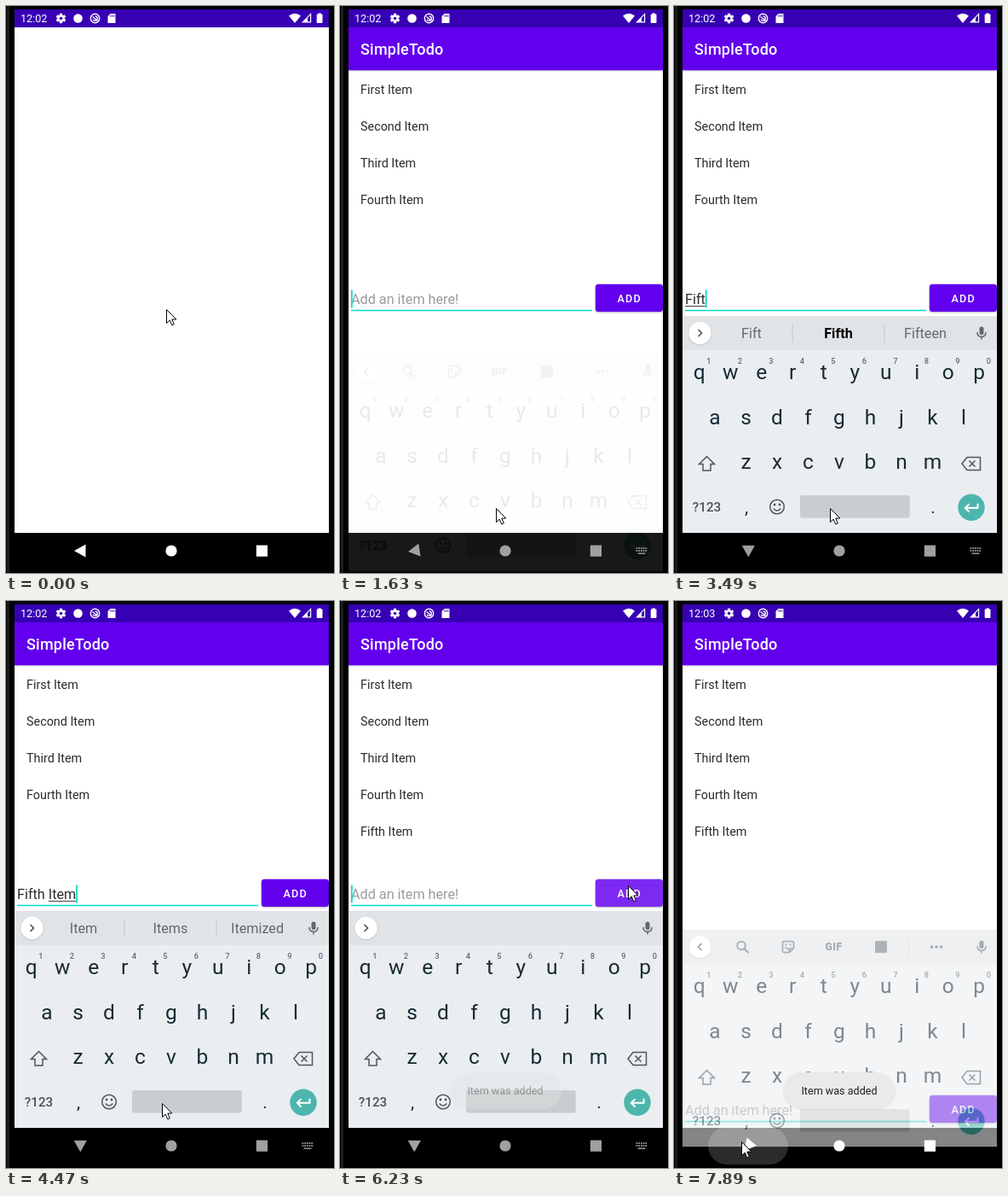
An HTML page with a canvas for the animation above (8000 ms loop, 385 by 664 pixels).

```html
<!DOCTYPE html>
<html lang="en">
<head>
<meta charset="utf-8">
<title>Todo list</title>
<style>
html, body { margin: 0; width: 100%; height: 100%; overflow: hidden; background: #000; }
canvas { display: block; width: 385px; height: 664px; }
</style>
</head>
<body>
<canvas id="stage"></canvas>
<script>
const W = 385, H = 664, LOOP = 8000, FONT = 'Roboto, sans-serif';
const PURPLE = '#6200ee', TEAL = '#03dac5', INK = '#172b34', SOFT = '#5f6a70', KEY = '#4b575d';
const scale = Math.max(1, window.devicePixelRatio || 1);

// Moments of the story, in ms.
const LAUNCH = 120, FOCUS = 1630, TYPE = 2720, TYPED = 4470, ADDED = 6080, TOOLS = 6640,
  MINUTE = 7480, BACK = 7620, CLOSE = 7690;
const PHRASE = 'Fifth Item';
const GUESSES = [['Fifth', 'Fifteen', 'Fifties'], ['Item', 'Items', 'Itemized']];

function prepare(canvas) {
  canvas.width = W * scale;
  canvas.height = H * scale;
  const c = canvas.getContext('2d');
  c.scale(scale, scale);
  return c;
}
const screen = prepare(document.getElementById('stage'));
const sheet = document.createElement('canvas');
const keysCtx = prepare(sheet);
let g = screen;

const ramp = (t, a, b) => Math.min(1, Math.max(0, (t - a) / (b - a)));
const easeOut = (u, power) => 1 - (1 - u) ** power;
const smooth = u => u * u * (3 - 2 * u);
const held = t => Math.floor((t + 20) / 135) * 135;

function rect(x, y, w, h, color) {
  g.fillStyle = color;
  g.fillRect(x, y, w, h);
}
function pill(x, y, w, h, r, color) {
  g.fillStyle = color;
  g.beginPath();
  g.roundRect(x, y, w, h, r);
  g.fill();
}
function dot(x, y, r, color) {
  g.fillStyle = color;
  g.beginPath();
  g.arc(x, y, r, 0, 7);
  g.fill();
}
function text(s, x, y, size, color, align = 'left', weight = 400, spacing = 0) {
  g.font = `${weight} ${size}px ${FONT}`;
  g.letterSpacing = spacing + 'px';
  g.textAlign = align;
  g.fillStyle = color;
  g.fillText(s, x, y);
  const width = g.measureText(s).width;
  g.letterSpacing = '0px';
  return width;
}
function stroke(d, x, y, color, width = 1.5) {
  g.save();
  g.translate(x, y);
  g.strokeStyle = color;
  g.lineWidth = width;
  g.stroke(new Path2D(d));
  g.restore();
}
function fill(d, x, y, color, turn = 0) {
  g.save();
  g.translate(x, y);
  g.rotate(turn * Math.PI / 180);
  g.fillStyle = color;
  g.fill(new Path2D(d));
  g.restore();
}
function shade(blur, dy, alpha, paint) {
  g.save();
  g.shadowColor = `rgba(0,0,0,${alpha})`;
  g.shadowBlur = blur * scale;
  g.shadowOffsetY = dy * scale;
  paint();
  g.restore();
}

function typedText(t) {
  if (t < TYPE || t >= ADDED) return '';
  const u = ramp(t, TYPE, TYPED) ** 1.3;
  return PHRASE.slice(0, 1 + Math.floor(u * (PHRASE.length - 1)));
}
function caretOn(t) {
  if (t < FOCUS) return false;
  const edit = t >= ADDED ? ADDED : t >= TYPED ? TYPED : t >= TYPE ? t : FOCUS + 120;
  return Math.floor((t - edit) / 500) % 2 === 0 || t < edit;
}
const keyboardShown = t =>
  easeOut(ramp(held(t), 1600, 2000), 2) - ramp(held(t), 7680, 8020);

function statusBar(t) {
  rect(10, 4, 369, 21, '#3700b3');
  text(t < MINUTE ? '12:02' : '12:03', 17, 19, 12.6, '#fff');
  for (let i = 0; i < 6; i++) {
    g.save();
    g.translate(64.5, 14.5);
    g.rotate(i * Math.PI / 3);
    rect(-1.6, -5.8, 3.2, 4, '#fff');
    g.restore();
  }
  dot(64.5, 14.5, 4.2, '#fff');
  dot(64.5, 14.5, 1.8, '#3700b3');
  dot(84.5, 14.5, 5.3, '#fff');
  stroke('M5.2 0A5.2 5.2 0 1 1-5.2 0A5.2 5.2 0 1 1 5.2 0M-3 -2L3 3M-2.4 1.2A2.7 2.7 0 1 0 0 -2.6', 104.5, 14.5, '#fff', 1.4);
  fill('M-1.5-5.5H4.5V5.5H-4.5V-2.5Z', 124, 14.5, '#fff');
  for (let i = 0; i < 3; i++) rect(122.3 + i * 2, 10.5, 1, 2.2, '#3700b3');
  fill('M0 6L-7-2.6Q0-8 7-2.6Z', 339, 14, '#fff');
  stroke('M-4.6 4.8L4.6-4.6V4.8Z', 353, 14, '#fff', 1.2);
  fill('M-4.6 4.8L1 -1V4.8Z', 353, 14, '#fff');
  pill(364.7, 9.6, 6.8, 10.4, 1, '#fff');
  rect(366.5, 8.4, 3.2, 2, '#fff');
}

function inputRow(t) {
  const focused = t >= FOCUS, raised = focused && t < CLOSE;
  g.save();
  if (raised) g.translate(0, -253);
  rect(13, 608.8, 283, focused ? 1.5 : 1, focused ? TEAL : '#858585');

  const entry = typedText(t), split = entry.lastIndexOf(' ') + 1;
  let end = 13;
  if (entry) {
    const from = end + text(entry.slice(0, split), end, 602.3, 16.2, '#2a2a2a');
    end = from + text(entry.slice(split), from, 602.3, 16.2, '#2a2a2a');
    rect(from, 604, end - from, 1, '#444');
  } else {
    text('Add an item here!', 13, 602.3, 16.2, '#9b9b9b');
  }
  if (caretOn(t)) rect(end, 585.5, 1.7, 21, TEAL);

  shade(2, 1, .3, () => pill(299.8, 578.8, 79.2, 32.3, 3.6, PURPLE));
  const glow = t < ADDED ? 0 : .165 * (1 - ramp(t, 6350, 6560));
  pill(299.8, 578.8, 79.2, 32.3, 3.6, `rgba(255,255,255,${glow})`);
  text('ADD', 339.7, 599.7, 12.6, '#fff', 'center', 500, 1.12);
  g.restore();
}

function app(t) {
  rect(10, 25, 369, 592, '#fff');
  if (t < LAUNCH) return;
  g.save();
  g.beginPath();
  g.rect(10, 25, 369, 592);
  g.clip();
  shade(2, .5, .22, () => rect(10, 25, 369, 50.3, PURPLE));
  text('SimpleTodo', 24, 57.2, 18, '#fff', 'left', 500, .22);
  ['First', 'Second', 'Third', 'Fourth', 'Fifth'].forEach((name, i) => {
    if (i < 4 || t >= ADDED) text(name + ' Item', 24, 102.6 + i * 43.1, 14.37, '#2a2a2a');
  });
  inputRow(t);
  g.restore();
}

function toolStrip() {
  stroke('M3.3-1.5A4.8 4.8 0 1 1-6.3-1.5A4.8 4.8 0 1 1 3.3-1.5M2 2L7 7', 80.5, 383, SOFT, 1.8);
  stroke('M-6.5-4.5Q-6.5-6.5-4.5-6.5H4.5Q6.5-6.5 6.5-4.5V1.5L1.5 6.5H-4.5Q-6.5 6.5-6.5 4.5ZM1.5 6V2H6.5M-3.5 0Q-2 3 1 2.5', 134, 383, SOFT);
  dot(131.5, 380.5, 1, SOFT);
  dot(136.5, 380.5, 1, SOFT);
  text('GIF', 187.5, 387.3, 12, SOFT, 'center', 900, .6);
  rect(236, 376, 14, 14, '#6f797e');
  rect(275, 372, 1, 22, '#cbd0d3');
  for (let i = 0; i < 3; i++) dot(302.5 + i * 5.5, 383, 1.8, SOFT);
}

function suggestions(entry) {
  const family = GUESSES[entry.includes(' ') ? 1 : 0], word = entry.split(' ').pop();
  const words = [word, ...family.filter(w => w !== word)].filter(Boolean).slice(0, 3);
  words.forEach((w, i) => {
    const best = i === 1 && w === family[0];
    text(w, 91 + i * 102, 389.2, 16.2, best ? '#000' : SOFT, 'center', best ? 700 : 400);
    if (i) rect(36.5 + i * 102 + (i - 1) * 6, 372, 1, 22, '#c3c8cb');
  });
}

function keyRows() {
  ['qwertyuiop', 'asdfghjkl', 'zxcvbnm'].forEach((row, r) => {
    const left = 194 - (row.length - 1) * 18.25;
    [...row].forEach((key, i) => text(key, left + i * 36.5, 437 + r * 52.7, 24.5, INK, 'center'));
  });
  for (let i = 0; i < 10; i++) text((i + 1) % 10, 41 + i * 36.5, 418.5, 9.3, '#5d6a70', 'center', 500);
  stroke('M0-8.5L-9 .5H-4.5V8H4.5V.5H9Z', 38.5, 536, KEY);
  stroke('M-11 0L-5-7.5H10.5V7.5H-5ZM-2.5-3.5L4.5 3.5M4.5-3.5L-2.5 3.5', 349, 536, KEY);
  text('?123', 38.5, 592, 15.2, '#46525a', 'center', 500);
  text(',', 85, 594, 21, INK, 'center');
  text('.', 304, 594, 21, INK, 'center');
  stroke('M8.3 0A8.3 8.3 0 1 1-8.3 0A8.3 8.3 0 1 1 8.3 0M-4.3 2Q0 7 4.3 2', 121, 586.5, KEY);
  dot(118, 584, 1.4, KEY);
  dot(124, 584, 1.4, KEY);
  pill(148, 573, 128.7, 26.5, 2.5, '#c9cdd0');
  dot(349, 587.2, 15.7, '#4db6ac');
  stroke('M7.5-5V0H-7M-2.5-4.7L-7.2 0L-2.5 4.7', 349, 587.8, '#fff', 2);
}

function keyboard(t) {
  g = keysCtx;
  g.clearRect(0, 0, W, H);
  rect(10, 363, 369, 254, '#eaeef1');
  rect(10, 363, 369, 40, '#e0e4e6');
  const tools = t < TYPE || t >= TOOLS;
  shade(2, .6, .2, () => dot(30.5, 383, 13.2, '#fff'));
  stroke(tools ? 'M2-4L-2 0L2 4' : 'M-2-4L2 0L-2 4', 30.5, 383, '#4a555b', 1.7);
  if (tools) toolStrip();
  else if (t < ADDED) suggestions(typedText(t));
  pill(358.5, 375.5, 5, 9.5, 2.5, SOFT);
  stroke('M-5-1Q-5 4.3 0 4.3Q5 4.3 5-1M0 4V7.5', 361, 383, SOFT);
  keyRows();
  g = screen;

  const shown = keyboardShown(t);
  g.save();
  g.globalAlpha = shown;
  g.drawImage(sheet, 0, 50 * (1 - shown), W, H);
  g.restore();
}

function navIcons(t) {
  const open = t >= FOCUS && t < CLOSE;
  const color = t < LAUNCH || t >= CLOSE ? '#fff' : open ? '#a0a0a0' : '#dedede';
  if (t >= BACK) pill(40, 616, 94, 44, 22, 'rgba(255,255,255,.17)');
  fill('M-7.3 0L6.2-7.6V7.6Z', 87.3, 638, color, -90 * keyboardShown(t));
  dot(194, 638, 6.6, color);
  rect(293.8, 631.5, 13.2, 13.2, color);
  if (open) {
    for (let i = 0; i < 10; i++) rect(347.5 + i % 5 * 2.7, 634 + (i >> 2 > 1 || i > 4 ? 3 : 0), 1.8, 1.9, '#909090');
    rect(349.5, 640.3, 9, 1.6, '#909090');
  }
}

function toast(t) {
  const alpha = ramp(held(t), 6090, 6400);
  g.save();
  g.globalAlpha = alpha;
  shade(2, .5, .06, () => pill(128, 552, 132, 43, 21.5, '#e8eaeb'));
  text('Item was added', 194, 578.2, 12.6, '#222', 'center');
  g.restore();
}

function pointer(t) {
  const now = held(t);
  const glides = [
    [182.5, 587.5, easeOut(ramp(now, 0, 1080), 3)],
    [338, 333, smooth(ramp(now, 5000, 5940))],
    [79, 633, smooth(ramp(now, 6500, 7400))]
  ];
  let x = 188, y = 355;
  for (const [toX, toY, u] of glides) {
    x += (toX - x) * u;
    y += (toY - y) * u;
  }
  const arrow = 'M.5.5V16.5L4.2 13L6.7 18.8L9.3 17.7L6.8 12H11.8Z';
  fill(arrow, Math.round(x), Math.round(y), '#fff');
  stroke(arrow, Math.round(x), Math.round(y), '#000', 1);
}

function draw(t) {
  rect(0, 0, W, H, '#000');
  rect(1, 0, 3, H, '#1b1b1b');
  statusBar(t);
  app(t);
  if (t >= FOCUS) keyboard(t);
  navIcons(t);
  toast(t);
  pointer(t);
}

const start = performance.now();
function loop() {
  draw((performance.now() - start) % LOOP);
  requestAnimationFrame(loop);
}
loop();
</script>
</body>
</html>
```
